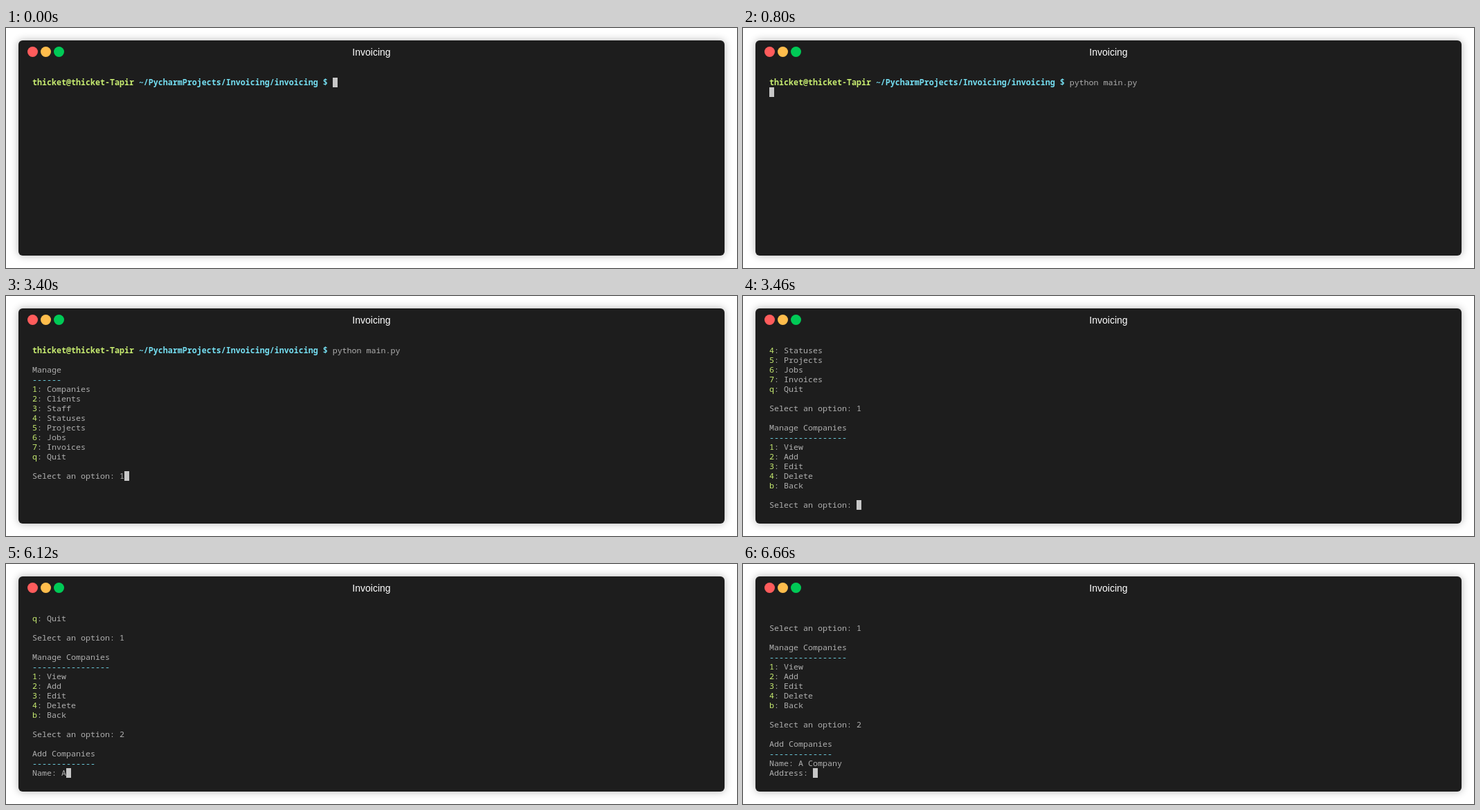
These frames come from a looping animation (1056 by 348 pixels, 8 s). An HTML page:

```html
<!DOCTYPE html>
<html lang="en">
<head>
<meta charset="utf-8">
<title>Invoicing</title>
<style>
  html, body { margin: 0; width: 100%; height: 100%; overflow: hidden; background: #fff; }
  #window {
    position: absolute; left: 18px; top: 18px; width: 1020px; height: 312px;
    border-radius: 6px; background: #1d1d1d; box-shadow: 0 0 12px rgba(0, 0, 0, .3);
  }
  #title {
    position: absolute; width: 100%; top: 9px; text-align: center; color: #fff;
    font: 14px/16px "Liberation Sans", Arial, sans-serif;
  }
  .dot { position: absolute; top: 9px; width: 15px; height: 15px; border-radius: 50%; }
  #screen {
    position: absolute; left: 20px; top: 54px; color: #afafaf; white-space: pre;
    font: 11.667px/14px "Noto Sans Mono", "DejaVu Sans Mono", monospace;
    font-variant-ligatures: none;
  }
  #screen div { height: 14px; }
  #screen b { font-weight: 700; }
  #screen i { display: inline-block; width: 7px; height: 14px; vertical-align: top; background: #c7c7c7; }
  .green { color: #c8ed71; }
  .blue { color: #75dff2; }
</style>
</head>
<body>
<div id="window">
  <div class="dot" style="left:13px;background:#ff5c5c"></div>
  <div class="dot" style="left:32px;background:#ffbd4c"></div>
  <div class="dot" style="left:51px;background:#00ca56"></div>
  <div id="title">Invoicing</div>
  <div id="screen"></div>
</div>
<script>
const LOOP = 8000, ROWS = 17, KEY = 60;
const screen = document.getElementById('screen');
const output = [];

const print = (time, text) => output.push([time, text]);
const type = (time, text) => [...text].forEach((ch, i) => print(time + i * KEY, ch));
const heading = text => `\n${text}\n${'-'.repeat(text.length)}\n`;
const menu = (title, items, exit) => heading(title) +
  items.map((item, i) => `${i + 1}: ${item}\n`).join('') +
  `${exit[0].toLowerCase()}: ${exit}\n\nSelect an option: `;

print(0, 'thicket@thicket-Tapir ~/PycharmProjects/Invoicing/invoicing $ ');
type(200, 'python m');
print(680, 'ain.py '); // tab completion
print(800, '\n');
print(2100, menu('Manage',
  ['Companies', 'Clients', 'Staff', 'Statuses', 'Projects', 'Jobs', 'Invoices'], 'Quit'));
print(3400, '1');
print(3460, '\n' + menu('Manage Companies', ['View', 'Add', 'Edit', 'Delete'], 'Back'));
print(4760, '2');
print(4820, '\n' + heading('Add Companies') + 'Name: ');
type(6120, 'A Company');
print(6660, '\nAddress: ');

const colour = line => line
  .replace(/^(\S+@\S+) (~.*\$)/, '<b class="green">$1</b> <b class="blue">$2</b>')
  .replace(/^-+$/, '<span class="blue">$&</span>')
  .replace(/^\w(?=:)/, '<span class="green">$&</span>');

const start = performance.now();
let shown = 0;

function draw() {
  const time = (performance.now() - start) % LOOP;
  const done = output.filter(([at]) => at <= time);
  if (done.length !== shown) {
    shown = done.length;
    const lines = done.map(([, text]) => text).join('').split('\n').slice(-ROWS).map(colour);
    screen.innerHTML = `<div>${lines.join('</div><div>')}<i></i></div>`;
  }
  requestAnimationFrame(draw);
}
draw();
</script>
</body>
</html>
```
